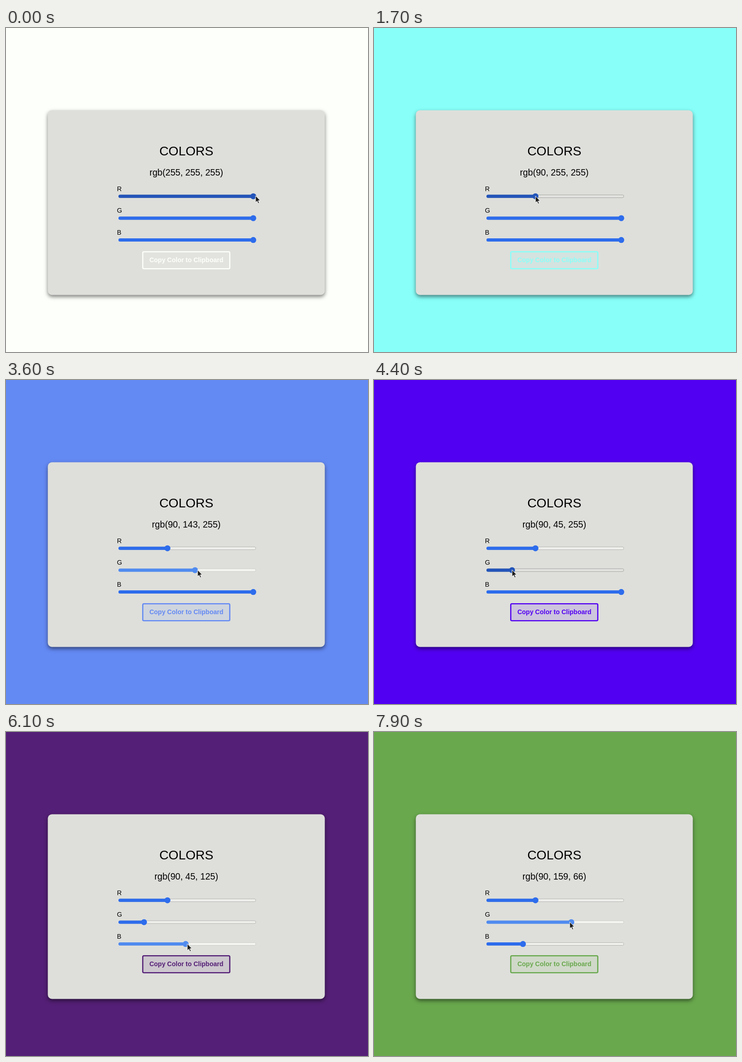
An HTML page for the animation above (8 s loop, 792 px wide and 707 px high).

```html
<!DOCTYPE html>
<html lang="en">
<head>
<meta charset="utf-8">
<title>Color mixer</title>
<style>
  html, body { margin: 0; width: 100%; height: 100%; overflow: hidden; }
  svg { display: block; }
  text { font-family: "Liberation Sans", Arial, sans-serif; }
  .centered { text-anchor: middle; }
  #card { fill: #dedfdb; filter: drop-shadow(0 4px 4px rgba(0, 0, 0, .5)); }
</style>
</head>
<body>
<svg id="stage" width="792" height="707" viewBox="0 0 792 707">
  <rect id="card" x="91.5" y="179.5" width="606" height="403" rx="9"/>
  <text class="centered" x="394.5" y="278.3" font-size="28">COLORS</text>
  <text class="centered" id="readout" x="394.5" y="322" font-size="19.6"></text>
  <g id="sliders"></g>
  <g id="button">
    <rect x="299.2" y="488.3" width="190.4" height="37" rx="2.5" fill="currentColor" fill-opacity=".12" stroke="currentColor" stroke-width="2.6"/>
    <text class="centered" x="394.6" y="511.4" font-size="14" font-weight="bold" fill="currentColor">Copy Color to Clipboard</text>
  </g>
  <path id="cursor" d="M0 0V14.6L3.4 11.6L5.8 17L8.2 16L5.8 10.7H10.3Z" fill="#1c1c1c" stroke="#fff"/>
</svg>
<script>
const LOOP = 8000, STEP = 100, POINTER_LAG = 18;
const $ = id => document.getElementById(id);

// The pointer glides to a slider, then drags it to a new value.
const strokes = [
  { slider: 0, to: 90, glide: [100, 200], drag: [775, 1675] },
  { slider: 1, to: 45, glide: [1950, 3050], drag: [3050, 4100] },
  { slider: 2, to: 66, glide: [4400, 4950], drag: [5150, 6663] },
  { slider: 1, to: 195, glide: [6700, 7000], drag: [7150, 8250] },
];
const looks = {
  normal: { fill: '#2d6cec', track: '#efefec', edge: '#b2b2b0' },
  hover: { fill: '#2354b9', track: '#e3e4e0', edge: '#a2a2a0' },
  active: { fill: '#508bef', track: '#f4f4f1', edge: '#cbcbc8' },
};

const clamp = v => Math.min(1, Math.max(0, v));
const mix = (a, b, p) => a + (b - a) * p;
const progress = (t, [start, end]) => clamp((t - start) / (end - start));
const ease = p => p * p * (3 - 2 * p);
const thumbX = value => 250.8 + value * 1.138;
const sliderY = i => 367.2 + i * 47.7;

function valuesAt(t) {
  const rgb = [255, 255, 255];
  for (const { slider, to, drag } of strokes)
    rgb[slider] = mix(rgb[slider], to, ease(progress(t, drag)));
  return rgb;
}

function pointerAt(t) {
  const seen = valuesAt(t - POINTER_LAG);
  let x = 546, y = 366;
  for (const { slider, glide } of strokes) {
    const p = progress(t, glide);
    const distance = thumbX(seen[slider]) - x;
    x += distance * (ease(p) + .2 * Math.sin(Math.PI * p));
    y = mix(y, sliderY(slider) - .5, ease(p));
  }
  return { x, y };
}

function lookOf(slider, t, pointer) {
  const dragged = strokes.some(s => s.slider === slider && t >= s.drag[0] && t < s.drag[1]);
  if (dragged) return looks.active;
  return Math.abs(pointer.y - sliderY(slider)) < 9 ? looks.hover : looks.normal;
}

// Colors appear as on a wide-gamut screen: channels mix in linear light.
const toLinear = v => (v /= 255) <= .04045 ? v / 12.92 : ((v + .055) / 1.055) ** 2.4;
const toByte = v => {
  v = clamp(v);
  return Math.round(255 * (v <= .0031308 ? 12.92 * v : 1.055 * v ** (1 / 2.4) - .055));
};
function screenColor(rgb) {
  const [r, g, b] = rgb.map(toLinear);
  return `rgb(${[
    .825 * r + .165 * g - .005 * b,
    1.15 * g - .04 * r - .06 * b,
    .875 * b + .07 * g + .015 * r,
  ].map(toByte)})`;
}

function set(element, attributes) {
  for (const key in attributes) element.setAttribute(key, attributes[key]);
  return element;
}
function add(name, attributes) {
  const element = document.createElementNS('http://www.w3.org/2000/svg', name);
  $('sliders').append(element);
  return set(element, attributes);
}

const sliders = ['R', 'G', 'B'].map((name, i) => {
  const y = sliderY(i);
  add('text', { x: 242.8, y: y - 11.6, 'font-size': 14.4 }).textContent = name;
  return {
    track: add('rect', { x: 246.5, y: y - 3, width: 300, height: 6, rx: 3 }),
    fill: add('rect', { x: 246, y: y - 3.5, height: 7, rx: 3.5 }),
    thumb: add('circle', { cy: y, r: 6.5 }),
  };
});

function draw(t) {
  const rgb = valuesAt(t).map(Math.round);
  const color = screenColor(rgb);
  const pointer = pointerAt(t);
  $('stage').style.background = color;
  $('button').style.color = color;
  $('readout').textContent = `rgb(${rgb.join(', ')})`;

  sliders.forEach(({ track, fill, thumb }, i) => {
    const x = thumbX(rgb[i]);
    const look = lookOf(i, t, pointer);
    set(track, { fill: look.track, stroke: look.edge });
    set(fill, { width: x - 246, fill: look.fill });
    set(thumb, { cx: x, fill: look.fill });
  });
  set($('cursor'), { transform: `translate(${pointer.x} ${pointer.y})` });
}

function tick() {
  draw(Math.floor(performance.now() % LOOP / STEP) * STEP);
  requestAnimationFrame(tick);
}
tick();
</script>
</body>
</html>
```
